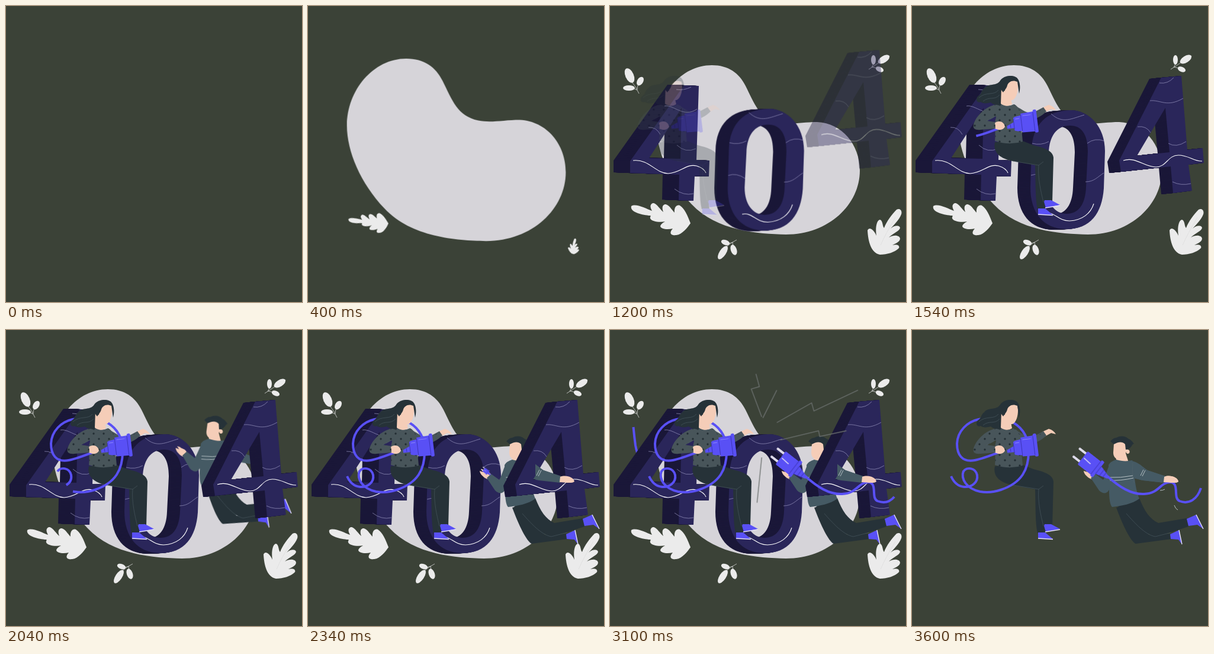
Recreate the animation shown at these times as an HTML page. Size 500 px wide and 500 px high, loop 3620 ms.

```html
<!DOCTYPE html>
<html lang="en">
<head>
<meta charset="utf-8">
<title>404</title>
<style>
html, body { margin: 0; width: 100%; height: 100%; overflow: hidden; background: #3b4237; }
svg { display: block; width: 100vw; height: 100vh; }
.leaf { fill: #ebebeb; }
.twig { fill: #ebebeb; }
.twig path { fill: none; stroke: #ebebeb; stroke-width: .7; }
.face { fill: #2a265a; fill-rule: evenodd; }
.side { fill: #1a1738; fill-rule: evenodd; }
.wave { fill: none; stroke: #9a97c0; stroke-width: .7; }
.bold { fill: none; stroke: #fff; stroke-width: 1.1; }
.cord { fill: none; stroke: #5950f5; stroke-width: 4; stroke-dasharray: 100 200; }
.violet { fill: #5950f5; }
.deep { fill: none; stroke: #3a32b4; stroke-width: .9; }
.sole { fill: none; stroke: #e4e1f5; stroke-width: 1.4; }
.skin { fill: #f5cdb8; }
.dark { fill: #263238; }
.knit { fill: #455a64; }
.top { fill: #48555a; }
.dots { fill: url(#dots); }
.fold { fill: none; stroke: #55646c; stroke-width: .5; }
.stripe { fill: none; stroke: #c3ccd0; stroke-width: .9; }
.spark { fill: none; stroke: #6d7270; stroke-width: .7; }
</style>
</head>
<body>
<svg viewBox="0 0 500 500">
<defs>
  <pattern id="dots" width="17" height="18" patternUnits="userSpaceOnUse">
    <circle cx="4" cy="4" r="1.700" fill="#222d33"/>
    <circle cx="12" cy="13" r="1.700" fill="#222d33"/>
  </pattern>
  <clipPath id="reach"><rect x="384" y="200" width="80" height="90"/></clipPath>
</defs>

<g class="set">
  <path id="blob" fill="#d6d4d9" d="M172 100C200 100 218 113 229 135C244 165 252 190 285 197C305 201 325 196 350 196C392 198 422 234 422 278C422 335 370 386 297 386C250 385 180 380 138 335C100 295 79 245 79 205C79 150 120 100 172 100Z"/>
  <g id="leafL" class="leaf">
    <path d="M36 338C44 333 60 342 71 346C66 338 69 333 74 333C80 335 84 343 90 348C87 340 89 335 94 335C100 336 104 344 109 349C108 341 112 335 118 337C126 342 131 354 136 367C131 374 122 386 112 387C103 388 99 384 106 376C97 378 86 377 85 372C86 368 90 366 93 364C84 366 70 364 68 359C67 356 70 355 68 354C54 353 33 348 36 338Z"/>
  </g>
  <g id="leafR" class="leaf">
    <path d="M484 344C490 341 494 346 492 352C488 362 479 370 474 376C482 369 490 371 490 375C489 380 478 384 471 391C481 385 490 388 490 393C490 399 480 402 477 404C484 402 490 404 488 409C481 416 468 420 456 420C441 417 436 398 435 379C438 372 446 378 450 388C448 376 450 362 456 361C461 362 460 372 463 375C467 364 476 352 484 344Z"/>
    <path d="M482 357Q466 384 457 404" fill="none" stroke="#dcdcdc" stroke-width=".7"/>
  </g>
  <g id="twigA" class="twig">
    <path d="M49 148Q44 136 36 127M46 141Q46 136 48 132M46 142L39 139"/>
    <ellipse cx="33" cy="117.500" rx="7" ry="13" transform="rotate(-24 33 117.500)"/>
    <ellipse cx="51" cy="127" rx="5" ry="8" transform="rotate(32 51 127)"/>
    <ellipse cx="32" cy="138.500" rx="10" ry="4.600"/>
  </g>
  <g id="twigB" class="twig">
    <path d="M437 107Q445 102 455 95M442 104L445 98M443 103L450 105"/>
    <ellipse cx="445" cy="91" rx="4" ry="8"/>
    <ellipse cx="462.500" cy="90" rx="11" ry="5.500" transform="rotate(-32 462.500 90)"/>
    <ellipse cx="455.500" cy="107" rx="7" ry="4.200" transform="rotate(24 455.500 107)"/>
  </g>
  <g id="twigC" class="twig">
    <path d="M214 395Q204 400 196 407M208 399L201 401M207 400L208 405"/>
    <ellipse cx="195" cy="399.500" rx="7.500" ry="4.300" transform="rotate(20 195 399.500)"/>
    <ellipse cx="190.500" cy="416.500" rx="5.500" ry="13" transform="rotate(33 190.500 416.500)"/>
    <ellipse cx="209" cy="412" rx="5" ry="9" transform="rotate(-20 209 412)"/>
  </g>
  <path id="tail" class="cord" pathLength="100" d="M66 247C55 232 46 212 43 195Q41 180 39.500 164"/>
  <g id="fourL" data-depth="-28,-1">
    <path class="face" d="M125 134L150 135L146 260L168 261L167 288L143 287L141 329L116 328L117 285L34 282L34 262ZM121 172L119 258L66 257Z"/>
    <path class="wave" d="M112 141Q124 143 137 137M92 169C108 166 124 190 147 174M65 205Q78 204 85 217M113 235Q128 249 145 241M109 309Q124 321 141 317"/>
    <path class="bold" d="M39 261C66 258 76 282 98 283C120 282 128 266 146 270Q159 274 162 282"/>
  </g>
  <g id="zero" data-depth="-22,1">
    <path class="face" d="M267 176C298 175 326 203 326 245L324 308C321 350 302 377 260 377C222 376 200 350 200 306L202 244C203 200 228 177 267 176ZM267 202C244 202 232 220 231 248L228 306C228 334 242 351 261 351C282 351 293 334 294 306L297 246C297 219 288 202 267 202Z"/>
    <path class="wave" d="M235 182C254 200 270 190 291 184M203 232Q218 236 231 229M201 286Q214 281 229 291M296 232Q309 222 325 228M293 297C308 297 314 288 324 282"/>
    <path class="bold" d="M224 350C240 346 246 363 266 363C288 362 302 350 307 334"/>
  </g>
</g>

<g id="man">
  <path class="dark" d="M345 300L362 295L400 346L436 344L438 353L378 361C370 358 356 330 345 300Z"/>
  <path class="dark" d="M348 298L384 284C392 305 402 320 416 326L464 318L467 332L412 350C396 346 372 325 360 312Z"/>
  <path class="fold" d="M362 310C376 326 394 346 411 349L438 342"/>
  <path class="violet" d="M464 319L480 312L492 336L482 329L467 331ZM436 345L451 338L456 362L450 354L437 353Z"/>
  <path class="sole" d="M480 312L492 336M451 338L456 362"/>
  <path class="skin" d="M344 214L360 205L366 224L346 224Z"/>
  <g id="arm">
    <path class="knit" d="M368 221C382 221 390 233 398 237L428 247L426 258L390 254L368 249Z"/>
    <path class="stripe" d="M386 246L391 236M389 247L394 237"/>
    <path class="skin" d="M426 248C436 244 449 249 450 256C446 260 432 257 425 257Z"/>
  </g>
  <path class="knit" d="M345 219C355 222 364 222 372 220C376 230 374 260 384 285C372 294 354 297 338 299C332 292 333 270 333 252L332 228Q335 222 345 219Z"/>
  <path class="fold" d="M333 262L334 240M373 224Q371 240 375 258"/>
  <path class="stripe" d="M333 249Q352 250 373 246M333 254Q352 255 374 250"/>
  <path class="skin" d="M309 244C306 238 300 239 297 236L292 235L296 240L290 238C290 241 293 246 299 250L303 252Z"/>
  <path class="knit" d="M335 225C329 236 327 248 323 253L309 243L302 250L316 271C323 278 331 277 334 267Z"/>
  <path class="skin" d="M341 192C345 187 358 187 362 194L361 202C366 201 369 204 367 208Q363 211 361 206C361 212 358 218 351 218C344 219 340 214 340 207Z"/>
  <path class="dark" d="M335 188C338 185 341 182 345 182C353 177 362 180 366 184C371 186 373 190 375 192C371 193 372 197 366 201L361 202L360 193C354 187 347 190 341 193Z"/>
</g>

<g class="set">
  <g id="fourR" data-depth="-20,2">
    <path class="face" d="M421 121L455 118L465 243L491 240L493 265L467 268L473 312L441 316L437 271L353 280L350 261ZM428 172L435 247L380 253Z"/>
    <path class="wave" d="M418 130Q432 132 442 121M402 160C420 158 430 172 458 156M381 204Q396 202 403 214M433 232Q446 240 463 229M440 297Q454 304 471 300"/>
    <path class="bold" d="M357 261C378 254 392 272 412 272C430 272 432 252 450 252C468 252 476 263 490 262"/>
  </g>
  <g id="sparks" class="spark">
    <path d="M257 125L260 136L253 138L262 162"/>
    <path d="M275 139L263 163"/>
    <path d="M345 139L307 157L305 150L275 167"/>
    <path d="M335 174L312 179L311 174L278 182"/>
    <path d="M262 197L258 236"/>
  </g>
</g>

<g id="front">
  <path id="lead" class="cord" pathLength="100" d="M330 247C350 265 370 278 392 277C418 276 418 258 436 257C453 258 440 284 452 289C468 295 482 286 488 267"/>
  <g id="grip" clip-path="url(#reach)"><use href="#arm"/></g>
  <path class="stripe strays" d="M419 271Q424 271 427 269M443 296Q445 302 449 304"/>
  <g id="plug"><g transform="translate(300 225) rotate(38)">
    <rect x="-30" y="-11" width="18" height="4" rx="2" fill="#dedbea"/>
    <rect x="-30" y="6" width="18" height="4" rx="2" fill="#dedbea"/>
    <rect class="violet" x="-15" y="-14" width="29" height="28" rx="2"/>
    <rect class="violet" x="13" y="-17" width="6" height="33" rx="2"/>
    <path class="violet" d="M19 -8L30 -5L40 -2V2L30 5L19 8Z"/>
    <path class="deep" d="M13 -14V14M19 -8V8M26 -6V6M32 -4V4"/>
    <path class="sole" d="M-13 -1L2 0"/>
  </g></g>
</g>

<g id="woman">
  <path class="skin" d="M220 172L231 167Q239 169 243 176L235 174L224 180Z"/>
  <path class="top" d="M172 168C184 172 190 181 203 181L222 171L227 178C220 186 205 194 194 193L180 190Z"/>
  <path class="dots" d="M180 176L203 183L222 173L226 178C220 185 205 193 194 192Z"/>
  <path class="dark" d="M140 230C136 248 150 258 170 262L208 269C209 300 208 325 212 343L225 343L224 331L237 331L239 256C238 245 225 240 205 235L187 228Z"/>
  <path class="fold" d="M170 262L214 269L222 263M214 269C212 290 218 315 222 331"/>
  <path class="violet" d="M223 331L224 328L235 328L250 336L226 341ZM213 342L225 342L238 353L213 352Z"/>
  <path class="sole" d="M225 341L250 337M213 352L238 353.500"/>
  <path id="torso" class="top" d="M136 168L150 164Q160 172 172 166C182 170 185 182 184 196L187 229Q164 236 140 228C142 212 138 200 142 188Z"/>
  <use href="#torso" class="over"/>
  <path id="loop" class="cord" pathLength="100" d="M156 203C138 210 122 217 106 220C84 224 76 210 76 192C77 170 94 155 112 151C134 146 158 148 172 157C190 168 197 186 197 205C197 235 186 258 150 270C138 274 126 275 115 273C92 268 82 252 87 238"/>
  <path id="curl" class="cord" pathLength="100" d="M87 239C92 231 107 232 110 245C112 258 100 266 88 265C77 264 70 256 66 247"/>
  <path class="dark" d="M180 126C174 115 156 116 149 126C143 136 128 130 122 139C116 143 118 148 112 152C106 157 110 165 116 162C121 166 128 164 133 163C138 168 145 166 149 169L158 150Z"/>
  <path class="skin" d="M151 137L150 165Q160 172 169 166L167 156Z"/>
  <path class="skin" d="M159 134C163 126 173 123 178 127C181 140 177 157 169 159C162 160 157 153 156 146Z"/>
  <path class="dark" d="M148 138C146 122 166 113 177 121C182 126 184 136 181 148L178 128C170 124 163 128 161 134C160 139 157 141 154 146Z"/>
  <path class="fold" d="M113 155C125 144 138 152 146 142M120 161C130 152 140 160 148 150"/>
  <path class="skin" d="M139 198C146 192 156 195 157 204Q154 210 146 209L139 207Z"/>
  <path id="sleeve" class="top" d="M140 167C124 170 108 186 104 200C102 208 108 210 116 209L141 207L140 196L127 194L146 184Z"/>
  <use href="#sleeve" class="over"/>
  <path class="fold" d="M126 194L138 188"/>
  <g transform="translate(190 197) rotate(-7)">
    <path class="violet" d="M-30 2L-18 -3V7L-30 7ZM-18 -10Q-17 -12 -5 -13V14Q-17 13 -18 11ZM-5 -16L17 -17V17L-5 16Z"/>
    <rect class="violet" x="16" y="-20" width="6" height="39" rx="2.500"/>
    <path class="deep" d="M-18 -8V9M-5 -14V14M16 -16V16M-24 0V6"/>
    <path d="M-2 -12H12M-15 -8H-8" stroke="#8f89ff" fill="none"/>
  </g>
</g>
</svg>
<script>
const LOOP = 3620, END = 3600;
const $ = id => document.getElementById(id);

function play(el, steps, ease = 'linear') {
  const last = steps[steps.length - 1];
  const all = [[0, steps[0][1]], ...steps, [LOOP, last[1]]];
  el.animate(all.map(([t, css]) => ({ offset: t / LOOP, easing: ease, ...css })),
    { duration: LOOP, iterations: Infinity });
}

const shift = (x, y, opacity = 1, turn = 0) =>
  ({ transform: `translate(${x}px, ${y}px) rotate(${turn}deg)`, opacity });

function pop(id, x, y, steps, ease = 'ease-in-out') {
  $(id).style.transformOrigin = `${x}px ${y}px`;
  play($(id), steps.map(([t, s, r = 0]) =>
    [t, { transform: `scale(${s}) rotate(${r}deg)` }]), ease);
}

function trim(id, steps) {
  play($(id), steps.map(([t, p]) => [t, { strokeDashoffset: p ? 100 - p : 101 }]));
}

function appear(el, t) {
  play(el, [[t, { opacity: 0 }], [t, { opacity: 1 }]]);
}

// Extrude each digit by sweeping its face along the depth vector
document.querySelectorAll('[data-depth]').forEach(g => {
  const [dx, dy] = g.dataset.depth.split(',').map(Number);
  const face = g.querySelector('.face');
  const n = Math.abs(dx);
  for (let i = n; i > 0; i--) {
    const part = face.cloneNode();
    part.setAttribute('class', 'side');
    part.setAttribute('transform', `translate(${dx * i / n} ${dy * i / n})`);
    g.insertBefore(part, face);
  }
});

// Dotted knit: reuse the garment outline with the pattern fill
document.querySelectorAll('.over').forEach(u => {
  const p = document.querySelector(u.getAttribute('href')).cloneNode();
  p.removeAttribute('id');
  p.setAttribute('class', 'dots');
  u.replaceWith(p);
});

document.querySelectorAll('.set').forEach(g =>
  play(g, [[END, { opacity: 1 }], [END, { opacity: 0 }]]));

pop('blob', 250, 243, [[40, 0], [280, 1.21], [490, 1]]);
pop('leafL', 136, 368, [[240, 0, -24], [400, .65, -10], [530, 1.04, 0], [620, 1, 0]], 'linear');
pop('leafR', 447, 420, [[340, 0, -30], [400, .31, -20], [560, 1.02, 0], [640, 1, 0]], 'linear');
pop('twigA', 49, 148, [[580, 0], [760, 1.08], [860, 1]]);
pop('twigB', 437, 107, [[620, 0], [790, 1], [880, 1]]);
pop('twigC', 214, 395, [[600, 0], [780, 1.03], [870, 1]]);

play($('fourL'), [[600, shift(0, -119, 0)], [860, shift(0, 0)]], 'ease-out');
pop('zero', 252, 277, [[800, 0], [900, .58], [1060, 1.2], [1220, 1]], 'linear');
play($('fourR'), [[1130, shift(0, -72, 0)], [1400, shift(0, 0)]], 'ease-out');
play($('woman'), [[1150, shift(-77, 0, 0)], [1460, shift(0, 0)]], 'ease-out');

trim('loop', [[1470, 0], [1540, 11], [2040, 89], [2110, 100]]);
trim('curl', [[1900, 0], [2040, 53], [2220, 100]]);
trim('tail', [[2220, 0], [2680, 95], [2780, 100]]);

$('man').style.transformOrigin = '351px 200px';
play($('man'), [[1680, shift(0, -119, 0, 9)], [1800, shift(-1, -92, 1, 7)],
  [2040, shift(-1, -35, 1, 3.7)], [2280, shift(0, 0)]]);
appear($('grip'), 2280);
pop('plug', 300, 243, [[2280, 0], [2460, 1.12], [2580, 1]]);
trim('lead', [[2650, 0], [3140, 100]]);
appear(document.querySelector('.strays'), 3140);
pop('sparks', 268, 178, [[2560, 0], [2680, 1], [2900, 2.16], [3060, 1.96]], 'linear');
</script>
</body>
</html>
```
